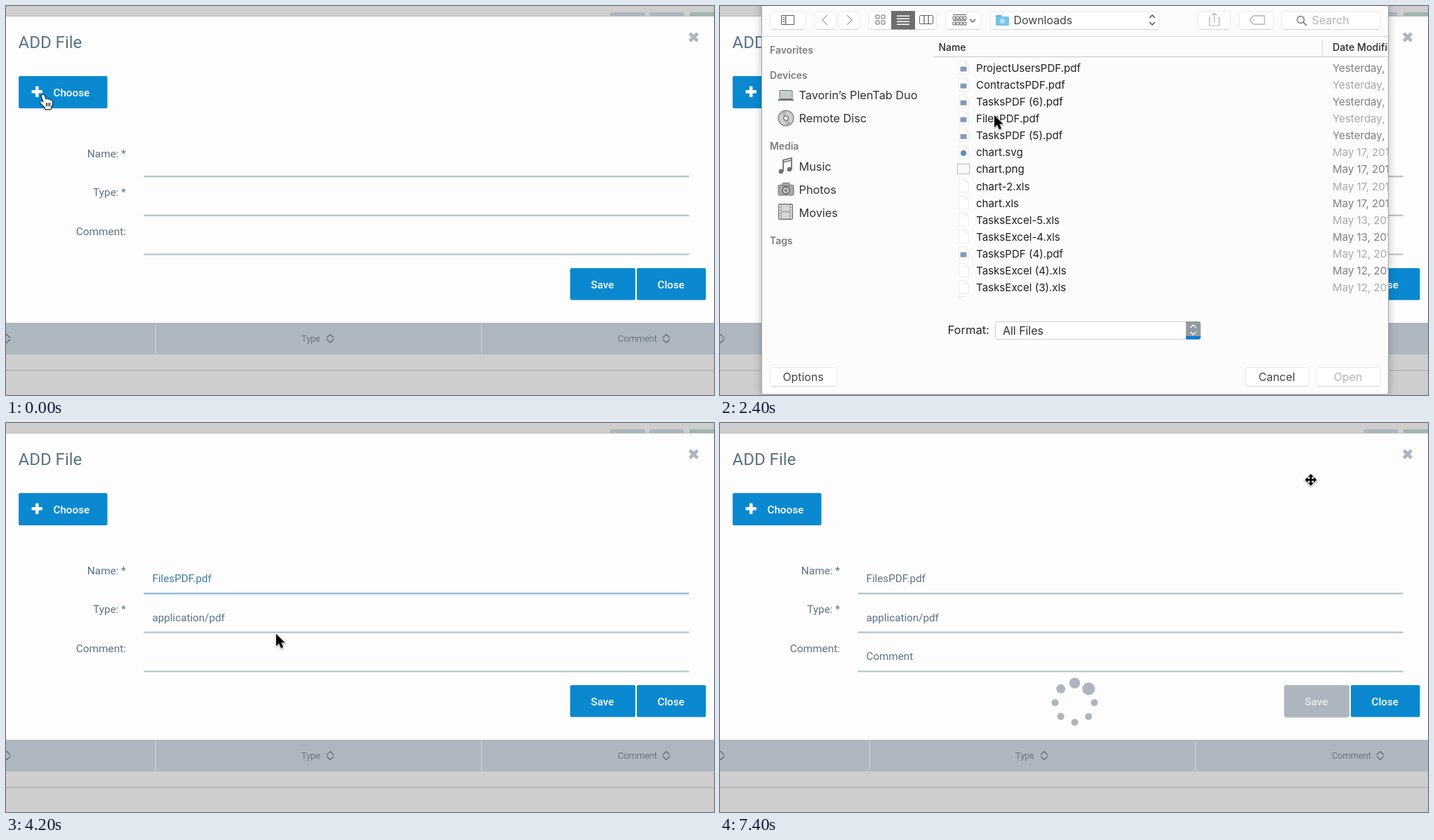
Recreate the animation shown at these times as an HTML page with a canvas. Size 1009 by 555 pixels, loop 7.6 s.

```html
<!DOCTYPE html>
<html lang="en">
<head>
<meta charset="utf-8">
<title>Add file</title>
<style>
html, body { margin: 0; width: 100%; height: 100%; overflow: hidden; background: #cecece; }
canvas { display: block; }
</style>
</head>
<body>
<canvas id="stage" width="1009" height="555"></canvas>
<script>
const ctx = document.getElementById('stage').getContext('2d');
const LOOP = 7600, STEP = 200, DIALOG_H = 554;
const FORM = 'Roboto, sans-serif', SYS = 'Inter, sans-serif';
const BLUE = '#0a89d0', SLATE = '#5b7386', GREY = '#adb6bf';
const HOVER = [120, 190, 222], FOCUS = [22, 121, 181];

const clamp = v => Math.max(0, Math.min(1, v));
const mix = (a, b, k) => 'rgb(' + a.map((v, i) => Math.round(v + (b[i] - v) * k)) + ')';

function box(x, y, w, h, fill, r = 0, stroke) {
  ctx.beginPath();
  ctx.roundRect(x, y, w, h, r);
  if (fill) { ctx.fillStyle = fill; ctx.fill(); }
  if (stroke) { ctx.strokeStyle = stroke; ctx.lineWidth = 1; ctx.stroke(); }
}

function disc(x, y, r, fill) {
  ctx.beginPath();
  ctx.arc(x, y, r, 0, 7);
  ctx.fillStyle = fill;
  ctx.fill();
}

function path(d, stroke, width = 1, fill) {
  const p = new Path2D(d);
  if (stroke) { ctx.strokeStyle = stroke; ctx.lineWidth = width; ctx.stroke(p); }
  if (fill) { ctx.fillStyle = fill; ctx.fill(p); }
}

function text(s, x, y, size, color, font = SYS, weight = 400, align = 'left') {
  ctx.font = `${weight} ${size}px ${font}`;
  ctx.textAlign = align;
  ctx.fillStyle = color;
  ctx.fillText(s, x, y);
}

function at(x, y, draw) {
  ctx.save();
  ctx.translate(x, y);
  draw();
  ctx.restore();
}

// Form page

function sorter(x, y) {
  at(x, y, () => path('M-5 -1L0 -6L5 -1M-5 1L0 6L5 1', '#56636f', 1.1));
}

function page(t) {
  box(0, 0, 1009, 555, '#cecece');
  if (t < 5200) box(861, 9, 50, 8, GREY, 2);
  box(917, 9, 49, 8, GREY, 2);
  box(974, 9, 40, 8, '#9db5ae', 2);
  box(0, 14, 1009, 1, '#b9bcbe');
  box(0, 15, 1009, 437, '#fdfdfd');
  box(0, 452, 1009, 45, '#aeb7bf');
  box(213, 454, 1, 42, '#d3d8dc');
  box(677, 454, 1, 42, '#d3d8dc');
  text('Type', 421, 479, 12.8, '#4b5863', FORM, 300);
  text('Comment', 872, 479, 12.8, '#4b5863', FORM, 300);
  [1, 462, 941].forEach(x => sorter(x, 474.5));
  box(0, 519.5, 1009, 1, '#aaaaaa');
}

function field(label, value, row, glow = 0, tone = HOVER) {
  const y = row * 55.6;
  text(label, 171, 215.5 + y, 15.4, SLATE, FORM, 400, 'right');
  text(value, 208.5, 227 + y, 15.2, mix([91, 115, 134], [40, 124, 175], tone === HOVER ? glow : 0), FORM);
  box(196.5, 242 + y, 777, 2.4, mix([185, 200, 206], tone, glow));
}

function button(label, x, y, w, h, tx, fill, ink = '#fff') {
  box(x, y, w, h, fill, 2);
  text(label, tx, y + 29, 15.2, ink, FORM, 500);
}

function spinner(t) {
  const lead = 7 + (t - 7400) / 125;
  for (let i = 0; i < 8; i++) {
    const a = i * Math.PI / 4;
    const lag = ((lead - i) % 8 + 8) % 8;
    disc(505.5 + 28 * Math.cos(a), 399 + 28 * Math.sin(a), Math.max(5, 9 - lag * 1.3), GREY);
  }
}

function form(t) {
  const filled = t >= 3600, pressed = t >= 200 && t < 1600, busy = t >= 6600;
  const hover = clamp(1 - Math.abs(t - 4050) / 350);
  const focus = t < 6400 ? clamp((t - 4400) / 400) : clamp((6600 - t) / 200);
  const typed = 'Comment'.slice(0, Math.max(0, Math.floor((t - 5400) / 200 * 3)));
  text('ADD File', 17.5, 60, 24, SLATE, FORM);
  at(980, 44.5, () => path('M-5.5 -5.5L5.5 5.5M5.5 -5.5L-5.5 5.5', GREY, 4.6));
  button('Choose', 18, 100, 126.5, 46, 67.5, pressed ? '#1272b2' : BLUE);
  box(36.5, 120, 15.5, 4.4, '#fff', 1);
  box(42, 114.5, 4.5, 15.5, '#fff', 1);
  field('Name: *', filled ? 'FilesPDF.pdf' : '', 0, hover);
  field('Type: *', filled ? 'application/pdf' : '', 1);
  field('Comment:', typed, 2, focus, FOCUS);
  if (busy) box(806, 378, 89, 43, '#d5d9dc', 2);
  button('Save', 804, 374, 93, 45.5, 833.5, busy ? GREY : BLUE, busy ? '#e9ecef' : '#fff');
  button('Close', 899, 374, 98.5, 45.5, 928.5, BLUE);
  if (busy) spinner(t);
}

// File dialog

const FILES = ['ProjectUsersPDF.pdf', 'ContractsPDF.pdf', 'TasksPDF (6).pdf', 'FilesPDF.pdf',
  'TasksPDF (5).pdf', 'chart.svg', 'chart.png', 'chart-2.xls', 'chart.xls', 'TasksExcel-5.xls',
  'TasksExcel-4.xls', 'TasksPDF (4).pdf', 'TasksExcel (4).xls', 'TasksExcel (3).xls'];
const dateOf = i => i < 5 ? 'Yesterday, 12:40' : `May ${i < 9 ? 17 : i < 11 ? 13 : 12}, 2016`;

function control(x, y, w, h) {
  box(x + .5, y + .5, w, h, '#fff', 4, '#ebebeb');
  box(x + 3, y + h, w - 5, 1, '#d2d2d2');
}

function fileIcon(name, y) {
  const ext = name.slice(-3);
  if (ext === 'png') {
    box(338.5, y - 7.5, 17, 14, '#fff', 0, '#b4b4b4');
    box(340.5, y - 4.5, 13, 9, '#f8f8f8');
    return;
  }
  at(340.5, y - 9.5, () => path('M0 0H9L13.5 4.5V18H0ZM9 0V4.5H13.5', '#dcdcdc', 1, '#fff'));
  if (ext === 'pdf') box(342.5, y - 2, 9, 7, '#7f9cb8');
  if (ext === 'svg') disc(347, y + 1, 4.2, '#5f8cb6');
}

function updown(x, y, color) {
  at(x, y, () => path('M-4 -3L0 -7L4 -3M-4 3L0 7L4 3', color, 1.5));
}

function toolbar() {
  const ink = '#606060', faint = '#b4b4b4';
  [[71, 50], [134, 31], [168, 30], [211, 97], [321, 51], [385, 241], [680, 47], [740, 48], [800, 141]]
    .forEach(([x, w]) => control(x, 7, w, 26));
  box(87.5, 13.5, 18, 13, null, 0, ink);
  box(93, 13, 1.3, 14, ink);
  [16, 19, 22].forEach(y => box(89, y, 3, 1, ink));
  path('M153 13L146 20L153 27M181 13L188 20L181 27', faint, 1.6);
  for (let i = 0; i < 4; i++) box(222 + i % 2 * 8, 13 + (i >> 1) * 8, 5, 5, null, 1, ink);
  box(244, 7, 34, 26.5, '#6e6e6e');
  for (let i = 0; i < 4; i++) box(252, 13.5 + i * 4, 18, 1.5, '#fff');
  box(284.5, 13.5, 19, 12, null, 1, ink);
  path('M291 13V26M297 13V26', ink, 1.3);
  for (let i = 0; i < 8; i++) box(332 + i % 4 * 5, 15 + (i >> 2) * 8, 3.6, 4, null, 0, ink);
  path('M332 12.5H351M332 20.5H351', ink);
  path('M356 19L360 23L364 19', ink, 1.5);
  box(393, 13, 9, 5, '#5eb5e4', 1);
  box(393, 15, 19, 13, '#74c4ec', 1.5);
  disc(402.5, 21.5, 3.5, '#b7e2f5');
  text('Downloads', 418.5, 26, 15.9, '#444');
  updown(616, 20, '#565656');
  path('M700 17H697.5V28H711.5V17H709M704.5 23V10M701 13.5L704.5 10L708 13.5', faint, 1.2);
  path('M755 20L760 14H776V26H760Z', faint, 1.3);
  disc(760.5, 20, 1, faint);
  ctx.beginPath();
  ctx.arc(827.5, 19.5, 5, 0, 7);
  ctx.strokeStyle = '#777';
  ctx.lineWidth = 1.4;
  ctx.stroke();
  path('M831 23L836 28', '#777', 1.7);
  text('Search', 843.5, 26, 16, '#b5b5b5');
  box(60, 43, 892, 1, '#d4d4d4');
}

function sidebar() {
  [['Favorites', 68], ['Devices', 104], ['Media', 205], ['Tags', 340]]
    .forEach(([s, y]) => text(s, 71, y, 13.9, '#7d7d7d', SYS, 600));
  [['Tavorin’s PlenTab Duo', 133], ['Remote Disc', 166], ['Music', 234.5], ['Photos', 267.5], ['Movies', 300.5]]
    .forEach(([s, y]) => text(s, 112.5, y, 16.3, '#333'));
  const ink = '#727272';
  box(85, 120.5, 18, 12, '#c4d0d0', 1, ink);
  box(82.5, 133, 23, 2, ink, 1);
  disc(94, 160, 11.5, '#818181');
  disc(94, 160, 10.3, '#cfcfcf');
  path('M94 160L87 152A10 10 0 0 1 94 150ZM94 160L101 168A10 10 0 0 1 94 170Z', null, 1, '#b2b2b2');
  disc(94, 160, 4, '#848484');
  disc(94, 160, 2.5, '#f3f3f3');
  path('M90 236V220L102 217V233M90 223L102 220', ink, 1.8);
  disc(87, 236, 3.3, ink);
  disc(99, 233, 3.3, ink);
  box(83, 255.5, 22, 14.5, '#a9a9a9', 2, ink);
  box(89, 252.5, 10, 4, '#a9a9a9', 1, ink);
  disc(94, 263, 5.7, '#606060');
  disc(94, 263, 4, '#ddd');
  disc(94, 263, 2.4, '#858585');
  box(83.5, 282.5, 20, 22, '#aaa', 1, ink);
  box(88, 284, 11, 8.5, '#d7d7d7');
  box(88, 294.5, 11, 8.5, '#d7d7d7');
  for (let i = 0; i < 5; i++) {
    box(84.5, 284.5 + i * 4, 2, 2, '#fff');
    box(100.5, 284.5 + i * 4, 2, 2, '#fff');
  }
}

function fileList(picked) {
  text('Name', 311.5, 63.5, 13.9, '#2b2b2b', SYS, 500);
  text('Date Modified', 873, 63.5, 14.2, '#2b2b2b', SYS, 500);
  box(858, 49, 1, 21, '#d0d0d0');
  box(304, 72, 648, 1, '#c8c8c8');
  FILES.forEach((name, i) => {
    const y = 88.5 + i * 24.08, on = picked && i === 3;
    if (on) box(304, y - 12, 648, 23.5, '#0b78e0');
    fileIcon(name, y);
    text(name, 365, y + 5.5, on ? 14.8 : 15.1, on ? '#fff' : '#202020', SYS, on ? 600 : 400);
    text(dateOf(i), 873, y + 5.5, on ? 14.6 : 15.1, on ? '#fff' : i % 2 ? '#a6aaad' : '#808080', SYS, on ? 600 : 400);
  });
  path('M340 417V415H350', '#dcdcdc');
}

function dialog(t) {
  const p = t < 2000 ? clamp((1000 - t) / 600) : clamp((t - 3000) / 600);
  if (p >= 1) return;
  const picked = t >= 2600;
  ctx.save();
  ctx.translate(0, Math.round(-DIALOG_H * Math.pow(p, 1.74)));
  ctx.shadowColor = 'rgba(0,0,0,.3)';
  ctx.shadowBlur = 12;
  ctx.shadowOffsetY = 2;
  box(60, -20, 892, DIALOG_H + 20, '#fcfcfc');
  ctx.shadowColor = 'transparent';
  box(59.5, -20, 893, DIALOG_H + 20, null, 0, '#a4a9ac');
  ctx.beginPath();
  ctx.rect(60, -20, 892, DIALOG_H + 20);
  ctx.clip();
  toolbar();
  sidebar();
  fileList(picked);
  text('Format:', 324.5, 468, 16.5, '#262626');
  box(392.5, 450.5, 292, 25, '#fff', 3, '#cfcfcf');
  box(664, 450, 21, 25.5, '#929ba2', [0, 3, 3, 0]);
  box(664, 471, 21, 4.5, '#0b7cdb', [0, 0, 3, 0]);
  updown(674.5, 462, '#fff');
  text('All Files', 403, 469, 15.9, '#2b2b2b');
  [['Options', 71, 95, '#444'], ['Cancel', 748, 91, '#444'], ['Open', 849, 92, picked ? '#222' : '#b4b4b4']]
    .forEach(([s, x, w, ink]) => {
      control(x, 515, w, 27);
      text(s, x + w / 2, 534.5, 15.9, ink, SYS, 400, 'center');
    });
  ctx.restore();
}

// Pointer: time, x, y, shape

const MOVES = [
  [0, 50, 126, 'hand'], [800, 50, 126, 'arrow'], [1200, 243, 113, 'arrow'],
  [2200, 391, 156, 'arrow'], [2600, 391, 156, 'arrow'], [3200, 389, 158, 'arrow'],
  [3600, 389, 158, 'arrow'], [4200, 385, 301, 'arrow'], [4400, 366, 332, 'beam'],
  [5400, 354, 333, 'beam'], [5800, 354, 333, 'beam'], [6000, 640, 384, 'arrow'],
  [6200, 846, 393, 'hand'], [6600, 846, 393, 'arrow'], [7200, 843, 130, 'move'],
  [7400, 842, 81, 'move'], [7600, 842, 81, 'move']
];

const SHAPES = {
  arrow() {
    path('M0 0V17L4 13.3L7 20L10 18.7L7.2 12.2H12.5Z', '#fff', 2, '#000');
  },
  hand() {
    path('M1 1C3 -1 4 1 5 3L7 8C7 6 10 6 10 8C11 6 13 7 13 9C15 8 16 9 16 11V15L14 18V21H6V19L-1 12C-1 9 2 10 4 12L1 4Z', '#000', 1.4, '#fff');
    path('M7.5 12V17M10 12V17M12.5 12V17', '#000', 1);
  },
  beam() {
    const d = 'M-4.5 -9.5Q0 -9.5 0 -6V6Q0 9.5 -4.5 9.5M4.5 -9.5Q0 -9.5 0 -6V6Q0 9.5 4.5 9.5M-2.5 2H2.5';
    path(d, '#fff', 3);
    path(d, '#222', 1.5);
  },
  move() {
    const d = 'M0 -8L3.5 -4.5H1V-1H4.5V-3.5L8 0L4.5 3.5V1H1V4.5H3.5L0 8L-3.5 4.5H-1V1H-4.5V3.5L-8 0L-4.5 -3.5V-1H-1V-4.5H-3.5Z';
    path(d, '#fff', 3);
    path(d, '#000', .5, '#000');
  }
};

function pointer(t) {
  const i = MOVES.findIndex((m, n) => n && t < m[0]) - 1;
  const [t0, x0, y0, shape] = MOVES[i], [t1, x1, y1] = MOVES[i + 1];
  const k = (t - t0) / (t1 - t0);
  at(x0 + (x1 - x0) * k, y0 + (y1 - y0) * k, () => {
    ctx.shadowColor = 'rgba(0,0,0,.3)';
    ctx.shadowBlur = 2;
    ctx.shadowOffsetY = 1;
    SHAPES[shape]();
  });
}

const start = performance.now();

function frame() {
  const t = Math.floor((performance.now() - start) % LOOP / STEP) * STEP;
  page(t);
  form(t);
  dialog(t);
  pointer(t);
  requestAnimationFrame(frame);
}
frame();
</script>
</body>
</html>
```
